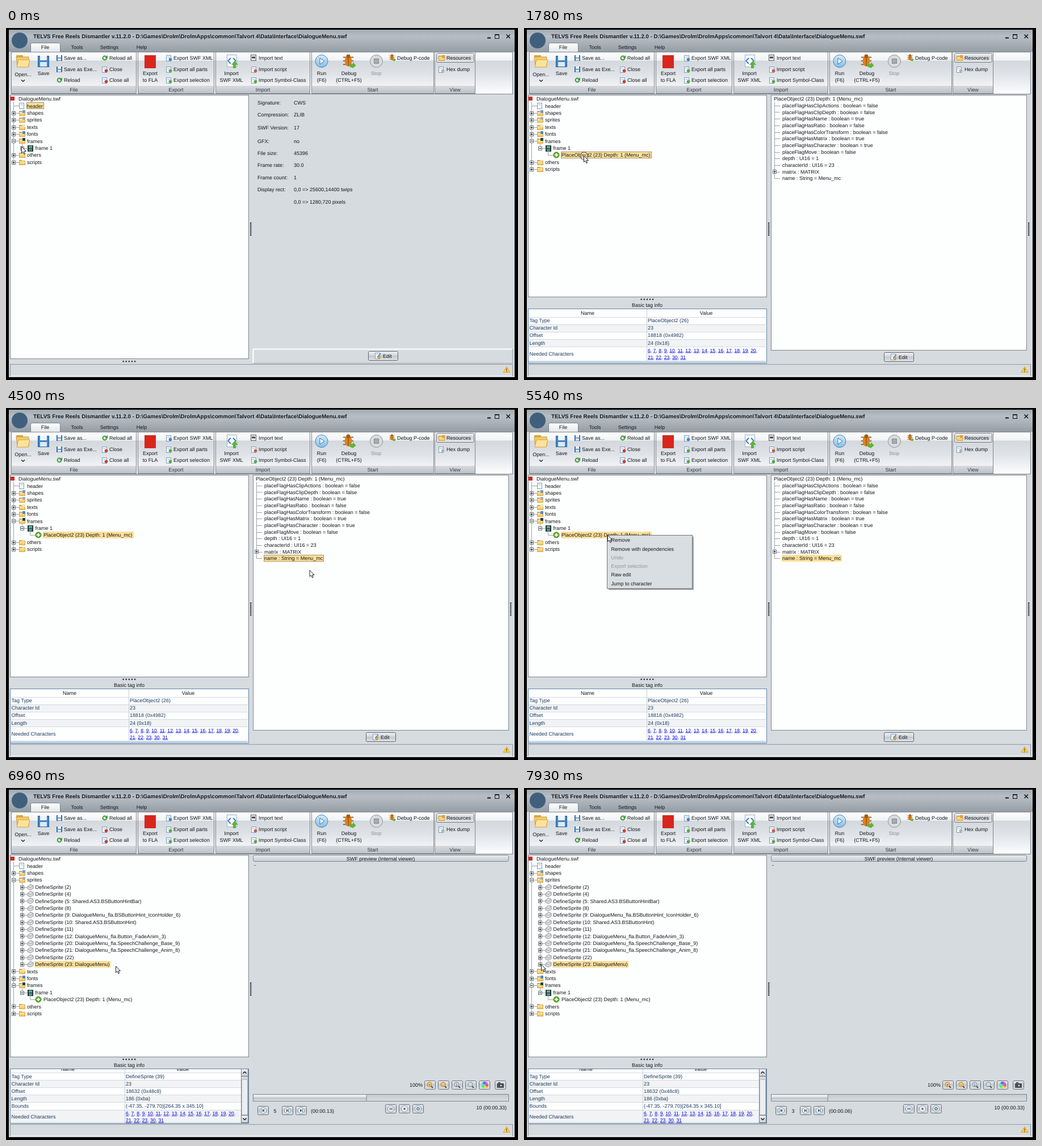
Recreate the animation shown at these times as an HTML page with a canvas. Size 902 by 621 pixels, loop 7990 ms.

```html
<!DOCTYPE html>
<html lang="en">
<head>
<meta charset="utf-8">
<title>Resource browser</title>
<style>
html, body { margin: 0; width: 100%; height: 100%; overflow: hidden; background: #000; }
canvas { display: block; }
</style>
</head>
<body>
<canvas id="stage" width="902" height="621"></canvas>
<script>
const LOOP = 7990;
const EXPAND = 480, SELECT = 1750, PICK_NAME = 3310, MENU_OPEN = 5360, JUMP = 6570;
const BODY = '#d6dbdf', INK = '#15181b', EDGE = '#7d858c', NAVY = '#1d3a60', PICKED = '#fde09c';
const c = document.getElementById('stage').getContext('2d');
c.textRendering = 'geometricPrecision';

function box(x, y, w, h, fill, stroke) {
  if (fill) { c.fillStyle = fill; c.fillRect(x, y, w, h); }
  if (stroke) { c.strokeStyle = stroke; c.lineWidth = 1; c.strokeRect(x + .5, y + .5, w - 1, h - 1); }
}
function rounded(x, y, w, h, r, fill, stroke) {
  c.beginPath(); c.roundRect(x + .5, y + .5, w - 1, h - 1, r);
  c.fillStyle = fill; c.fill();
  c.strokeStyle = stroke; c.lineWidth = 1; c.stroke();
}
function line(x1, y1, x2, y2, color, width = 1) {
  c.beginPath(); c.moveTo(x1, y1); c.lineTo(x2, y2);
  c.strokeStyle = color; c.lineWidth = width; c.stroke();
}
function disc(x, y, r, fill, stroke, width = 1) {
  c.beginPath(); c.arc(x, y, r, 0, 7);
  if (fill) { c.fillStyle = fill; c.fill(); }
  if (stroke) { c.strokeStyle = stroke; c.lineWidth = width; c.stroke(); }
}
function poly(points, fill, stroke) {
  c.beginPath(); points.forEach(p => c.lineTo(...p)); c.closePath();
  if (fill) { c.fillStyle = fill; c.fill(); }
  if (stroke) { c.strokeStyle = stroke; c.lineWidth = 1; c.stroke(); }
}
function shade(y1, y2, ...stops) {
  const g = c.createLinearGradient(0, y1, 0, y2);
  stops.forEach(([at, color]) => g.addColorStop(at, color));
  return g;
}
// y is the vertical middle of the capitals
function text(s, x, y, align = 'left', color = INK, size = 9, weight = '') {
  c.font = `${weight} ${size}px "Liberation Sans", Arial, sans-serif`;
  c.textAlign = align; c.fillStyle = color;
  c.fillText(s, x, y + 3.2);
}
const center = (s, x, y, color) => text(s, x, y, 'center', color);

// Icons, all placed by their middle
const icon = {
  page(x, y, badge) {
    box(x - 5, y - 5, 9, 11, '#f4f8fc', '#7f9dbd');
    line(x - 3, y - 1.5, x + 2, y - 1.5, '#a9bfd6');
    if (badge) disc(x + 2.5, y + 2.5, 2.8, badge);
  },
  folder(x, y, badge) {
    box(x - 5, y - 4, 5, 3, '#d9a63c');
    box(x - 5, y - 3, 11, 8, shade(y - 3, y + 5, [0, '#fdeeb9'], [1, '#efc04f']), '#d3a445');
    if (badge) box(x + 1, y - 5, 5, 5, badge);
  },
  disk(x, y, s = 5) {
    box(x - s, y - s, 2 * s, 2 * s, '#3f86c6', '#255f99');
    box(x - s * .6, y - s, s * 1.2, s * .8, '#eef4fa');
    box(x - s * .6, y + s * .1, s * 1.2, s * .8, '#dce9f5');
  },
  reload(x, y) {
    disc(x, y, 3.4, null, '#3f9a3c', 2);
    poly([[x, y], [x + 5, y], [x + 5, y - 5]], '#3f9a3c');
  },
  film(x, y) {
    box(x - 5, y - 5, 10, 11, '#20343a');
    box(x - 3, y - 4, 6, 4, '#5fb08a'); box(x - 3, y + 1, 6, 4, '#4a9a78');
  },
  sprite(x, y) {
    poly([[x - 5, y - 1], [x, y - 5], [x + 5, y - 3], [x + 5, y + 2], [x, y + 5], [x - 5, y + 3]], '#dcdedf', '#909496');
    line(x - 4, y - 1, x, y + 1, '#a2a6a8'); line(x, y + 1, x + 4, y - 2, '#a2a6a8');
  },
  plus(x, y) {
    disc(x, y, 5, '#62b324', '#3c8512');
    line(x - 3, y, x + 3, y, '#fff', 1.8); line(x, y - 3, x, y + 3, '#fff', 1.8);
  },
  mark(x, y) { box(x - 3, y - 4, 7, 7, '#d9281f'); },
  bug(x, y, s = 1) {
    for (const k of [-4, 0, 4]) line(x - 8 * s, y + k * 1.4 * s, x + 8 * s, y + k * 1.4 * s, '#7a4a14', 1.3 * s);
    c.beginPath(); c.ellipse(x, y, 5.5 * s, 8.5 * s, 0, 0, 7); c.fillStyle = '#d98320'; c.fill();
    line(x, y - 6 * s, x, y + 8 * s, '#8a4c0c', s);
    disc(x, y - 7 * s, 3 * s, '#a75b12');
    poly([[x + 2 * s, y + 5 * s], [x + 7 * s, y + 5 * s], [x + 7 * s, y + 2 * s], [x + 12 * s, y + 7 * s], [x + 7 * s, y + 11 * s], [x + 2 * s, y + 9 * s]], '#5db436');
  },
  warning(x, y) {
    poly([[x, y - 5], [x + 6, y + 5], [x - 6, y + 5]], '#fbd24a', '#dfa22a');
    line(x, y - 2, x, y + 2, '#6b4a0a', 1.3); box(x - .6, y + 3, 1.3, 1.3, '#6b4a0a');
  }
};

function drawWindow() {
  box(0, 0, 902, 621, '#000');
  box(5, 3, 891, 613, BODY);
  box(5, 3, 891, 39, shade(3, 42, [0, '#a3abb2'], [.3, '#b7bec5'], [.62, '#a9b0b7'], [1, '#959da5']));
  text('TELVS Free Reels Dismantler v.11.2.0 - D:\\Games\\Drolm\\DrolmApps\\common\\Talvort 4\\Data\\Interface\\DialogueMenu.swf', 48, 14.5, 'left', INK, 9.72, 'bold');
  line(848, 17.5, 854, 17.5, '#111', 2);
  box(861, 11, 8, 8, null, '#111'); line(861, 12, 869, 12, '#111', 1.5);
  line(881.5, 11.5, 888, 18, '#111', 1.5); line(888, 11.5, 881.5, 18, '#111', 1.5);

  rounded(43, 26, 53, 19, 3, shade(26, 42, [0, '#fff'], [1, '#e3e7ea']), EDGE);
  [['File', 69], ['Tools', 125], ['Settings', 182], ['Help', 239]].forEach(([s, x]) => center(s, x, 34));

  const ribbon = shade(42, 116, [0, '#fff'], [.2, '#f0f2f4'], [.22, '#d3d8dd'], [.55, '#e0e4e8'], [1, '#fdfdfe']);
  box(9, 42, 884, 75, ribbon, EDGE);
  [['File', 9, 230], ['Export', 232, 367], ['Import', 369, 536], ['Start', 538, 754], ['View', 755, 827]].forEach(([s, l, r]) => {
    box(l, 42, r - l, 74, ribbon, '#80878e');
    box(l + 1, 102, r - l - 2, 13, shade(102, 115, [0, '#d6dade'], [1, '#bcc3c9']));
    center(s, (l + r) / 2, 109, '#33393f');
  });
  disc(24, 22, 14, '#3f5f7d');
}

function drawRibbon() {
  box(18, 48, 12, 6, '#d9a63c');
  poly([[18, 51], [40, 51], [40, 68], [20, 68]], '#f3cc6b', '#c99a3c');
  poly([[22, 56], [42, 56], [39, 69], [19, 69]], '#fbe29a', '#d3a445');
  center('Open...', 30, 82);
  line(27, 91.5, 30, 94.5, INK, 1.3); line(30, 94.5, 33, 91.5, INK, 1.3);
  icon.disk(66, 59, 10); center('Save', 66, 80);

  const rows = [53, 72.5, 92];
  const column = (x, ...names) => names.forEach((s, i) => text(s, x, rows[i]));
  column(102, 'Save as...', 'Save as Exe...', 'Reload');
  column(182, 'Reload all', 'Close', 'Close all');
  column(295, 'Export SWF XML', 'Export all parts', 'Export selection');
  column(445, 'Import text', 'Import script', 'Import Symbol-Class');
  icon.disk(94, 53); icon.disk(94, 73); icon.reload(94, 92); icon.reload(174, 53);
  icon.page(174, 73, '#cf3a2b'); icon.page(174, 92, '#cf3a2b');
  icon.page(287, 53, '#4a82c4'); icon.page(287, 73, '#58a83e'); icon.page(287, 92, '#58a83e');
  box(431, 47, 10, 11, '#e5e8ea', '#5b6268'); line(433, 52, 439, 52, '#444', 3);
  icon.page(437, 73, '#cc5b4b'); icon.page(437, 92, '#58a83e');

  box(244, 48, 20, 23, '#d8261c');
  center('Export', 254, 80); center('to FLA', 254, 91.5);
  box(389, 47, 18, 22, '#f8fafc', '#9fb2c6');
  line(396, 53, 391, 58, '#3d7fc0', 2); line(391, 58, 396, 63, '#3d7fc0', 2);
  line(400, 53, 405, 58, '#3d7fc0', 2); line(405, 58, 400, 63, '#3d7fc0', 2);
  poly([[397, 65], [403, 58], [409, 65], [405, 65], [405, 71], [400, 71], [400, 65]], '#5db436');
  center('Import', 397, 80); center('SWF XML', 397, 91.5);

  disc(556, 58.5, 11, shade(47, 70, [0, '#d8edfb'], [1, '#83bde6']), '#4584b5');
  poly([[553, 53], [561, 58.5], [553, 64]], '#fff', '#2f6fa6');
  center('Run', 556, 80); center('(F6)', 556, 91.5);
  icon.bug(603, 58, 1.15); center('Debug', 604, 80); center('(CTRL+F5)', 604, 91.5);
  disc(652.5, 58.5, 11, '#d9dcde', '#8d9296'); box(648, 54, 9, 9, '#a6abaf', '#868b90');
  center('Stop', 652, 80, '#8c9196');
  icon.bug(680, 52, .58); text('Debug P-code', 689, 53);

  rounded(758, 44, 67, 17, 2, shade(44, 61, [0, '#f2f3f4'], [.5, '#d0d5d9'], [1, '#e9ecee']), '#70777d');
  icon.folder(767, 53, '#eb9a3b'); text('Resources', 776, 53);
  icon.page(767, 73, '#a9b4be'); text('Hex dump', 776, 72.5);
}

function handle(x, y, open) {
  x = Math.round(x); y = Math.round(y);
  box(x - 3, y - 3, 7, 7, '#fff', '#6d747a');
  line(x - 1.5, y + .5, x + 2.5, y + .5, '#111');
  if (!open) line(x + .5, y - 1.5, x + .5, y + 2.5, '#111');
}
function highlight(s, x, y, bordered) {
  c.font = '9px "Liberation Sans", Arial, sans-serif';
  box(x - 1, Math.round(y - 6), Math.round(c.measureText(s).width + 3), 12, PICKED, bordered && '#a8925c');
}

const SPRITES = ['2', '4', '5: Shared.AS3.BSButtonHintBar', '8', '9: DialogueMenu_fla.BSButtonHint_IconHolder_6',
  '10: Shared.AS3.BSButtonHint', '11', '12: DialogueMenu_fla.Button_FadeAnim_3', '20: DialogueMenu_fla.SpeechChallenge_Base_9',
  '21: DialogueMenu_fla.SpeechChallenge_Anim_8', '22', '23: DialogueMenu'].map(s => `DefineSprite (${s})`);
const PLACE = 'PlaceObject2 (23) Depth: 1 (Menu_mc)';

// Each row: level, label, icon, badge, handle
function treeRows(t) {
  return [
    [0, 'DialogueMenu.swf', 'mark'],
    [1, 'header', 'page'],
    [1, 'shapes', 'folder', '#6b9bd0', '+'],
    [1, 'sprites', 'folder', '#a9adb0', t >= JUMP ? '-' : '+'],
    ...(t >= JUMP ? SPRITES.map(s => [2, s, 'sprite', '', '+']) : []),
    [1, 'texts', 'folder', '#f3e3b0', '+'],
    [1, 'fonts', 'folder', '#4b86d0', '+'],
    [1, 'frames', 'folder', '#23423f', '-'],
    [2, 'frame 1', 'film', '', t >= EXPAND ? '-' : '+'],
    ...(t >= EXPAND ? [[3, PLACE, 'plus']] : []),
    [1, 'others', 'folder', '', '+'],
    [1, 'scripts', 'folder', '', '+']
  ];
}
function drawTree(t) {
  box(7, 118, 421, t < SELECT ? 466 : 357, '#fdfefe', EDGE);
  const picked = t < SELECT ? 'header' : t < JUMP ? PLACE : SPRITES[11];
  const lastY = [], handles = [];
  treeRows(t).forEach(([level, label, kind, badge, mark], i) => {
    const y = 125 + 12.4 * i, x = level ? 22.5 + 14.5 * level : 22, stemX = Math.round(x - 24) + .5;
    if (level) {
      const top = Math.max(lastY[level] || 0, lastY[level - 1] + 5);
      line(stemX, top, stemX, y, '#9aa1a7');
      line(stemX, Math.round(y) + .5, x - 14, Math.round(y) + .5, '#9aa1a7');
    }
    lastY[level] = y;
    if (mark) handles.push([stemX - .5, y, mark === '-']);
    icon[kind](level ? Math.round(x - 9) : 11, Math.round(y), badge);
    if (label === picked) highlight(label, x, y, t < PICK_NAME);
    text(label, x, y);
  });
  handles.forEach(h => handle(...h));
}

const FLAGS = [['ClipActions', 0], ['ClipDepth', 0], ['Name', 1], ['Ratio', 0], ['ColorTransform', 0], ['Matrix', 1], ['Character', 1]];
const FIELDS = [...FLAGS.map(([s, on]) => `placeFlagHas${s} : boolean = ${!!on}`),
  'placeFlagMove : boolean = false', 'depth : UI16 = 1', 'characterId : UI16 = 23', 'matrix : MATRIX', 'name : String = Menu_mc'];

function editButton(x, y) {
  rounded(x, y, 53, 17, 2, shade(y, y + 17, [0, '#f4f5f6'], [.45, '#d3d7db'], [.5, '#c2c8cd'], [1, '#e4e7ea']), '#60676d');
  icon.page(x + 17, y + 8, '#e0a136');
  line(x + 16, y + 11, x + 22, y + 4, '#4e87c6', 1.5);
  text('Edit', x + 26, y + 8.5);
}
function drawHeaderInfo() {
  [['Signature:', 'CWS', 132], ['Compression:', 'ZLIB', 152.5], ['SWF Version:', '17', 175.5], ['GFX:', 'no', 199.5],
   ['File size:', '45396', 220.5], ['Frame rate:', '30.0', 242], ['Frame count:', '1', 264],
   ['Display rect:', '0,0 => 25600,14400 twips', 285], ['', '0,0 => 1280,720 pixels', 307]].forEach(([name, value, y]) => {
    text(name, 443, y); text(value, 507, y);
  });
  box(435, 566, 458, 26, BODY, '#9aa2a9');
  line(435, 566.5, 892, 566.5, '#fff', 2); line(435.5, 566, 435.5, 591, '#fff', 2);
  editButton(638, 570);
}
function drawFields(t) {
  box(435, 118, 451, 451, '#fdfefe', EDGE);
  text(PLACE, 440, 125);
  line(441.5, 131, 441.5, 265, '#9aa1a7');
  FIELDS.forEach((s, i) => {
    const y = 136.8 + 11.68 * i;
    line(441, Math.round(y) + .5, 451, Math.round(y) + .5, '#9aa1a7');
    if (i === 11 && t >= PICK_NAME) highlight(s, 455, y, t < MENU_OPEN);
    text(s, 455, y);
  });
  handle(441, 253, false);
  editButton(634, 572);
}

function smallButton(x, y) {
  rounded(x, y, 20, 16, 2, shade(y, y + 16, [0, '#eceef0'], [.5, '#c5cbd0'], [1, '#dfe3e6']), '#6b7278');
}
function drawPreview(t) {
  rounded(435, 118, 451, 12, 3, shade(118, 130, [0, '#eceff1'], [1, '#c3c9ce']), EDGE);
  center('SWF preview (Internal viewer)', 660, 125);
  text('-', 437, 136);

  text('100%', 711, 524);
  ['+', '-', '1', '::'].forEach((s, i) => {
    const x = 737 + 24 * i;
    smallButton(x, 516);
    line(x + 11, 525, x + 15, 529, '#4f4a42', 2);
    disc(x + 9, 523, 4, i < 2 ? '#f8c878' : '#d7eaf6', i < 2 ? '#b97f28' : '#6f8798');
    text(s, x + 9, 523, 'center', '#333', 7);
  });
  smallButton(833, 516);
  for (let i = 0; i < 12; i++) {
    c.beginPath(); c.moveTo(843.5, 524); c.arc(843.5, 524, 6, i * .5236, (i + 1.1) * .5236);
    c.fillStyle = `hsl(${i * 30} 80% 62%)`; c.fill();
  }
  smallButton(861, 516);
  box(865, 521, 12, 8, '#4c5359'); box(867, 519, 4, 2, '#4c5359'); disc(872, 525, 2.5, '#a9c0d2', '#222');

  // Playback: ten frames, wrapping
  const step = Math.floor((Math.min(t, 7940) - 6950) / 34.9) + 4;
  const frame = (step % 10 + 10) % 10;
  box(435, 540, 451, 13, shade(540, 553, [0, '#c3c9ce'], [1, '#d9dde1']), EDGE);
  box(436, 541, Math.round(449 * frame / 9), 11, shade(541, 552, [0, '#eff1f3'], [.45, '#dfe3e6'], [.5, '#bac1c7'], [1, '#dce0e4']));
  if (frame) line(435.5 + 449 * frame / 9, 541, 435.5 + 449 * frame / 9, 552, EDGE);

  [[443, 561, '«'], [486, 561, '»'], [510, 561, '›'], [668, 558, 'Ⅱ'], [692, 558, '■'], [716, 558, '↻']].forEach(([x, y, s]) => {
    smallButton(x, y);
    disc(x + 10, y + 8, 5.5, '#eaf3f9', '#8098a9');
    if (s === 'Ⅱ') { box(x + 8, y + 6, 1.4, 4, '#33546d'); box(x + 11, y + 6, 1.4, 4, '#33546d'); }
    else if (s === '■') box(x + 8.5, y + 6.5, 3, 3, '#33546d');
    else if (s === '↻') disc(x + 10, y + 8, 2.2, null, '#33546d', 1.2);
    else {
      const d = s === '«' ? -1 : 1;
      poly([[x + 10 - 2 * d, y + 5], [x + 10 + d, y + 8], [x + 10 - 2 * d, y + 11]], '#33546d');
      line(x + 10 + 2 * d, y + 5, x + 10 + 2 * d, y + 11, '#33546d');
    }
  });
  text(frame + 1, 474, 569.5, 'center');
  text(`(00:00.${String(Math.floor(frame * 100 / 30)).padStart(2, '0')})`, 537, 569.5);
  text('10 (00:00.33)', 882, 564, 'right');
}

function links(numbers, x, y) {
  numbers.forEach((n, i) => {
    text(n, x, y, 'left', '#0000e0', 8.62);
    const w = c.measureText(n).width;
    line(x, y + 4.5, x + w, y + 4.5, '#0000e0', .8);
    x += w;
    const comma = i < numbers.length - 1 || n === 20 ? ', ' : '';
    text(comma, x, y, 'left', NAVY, 8.62);
    x += c.measureText(', ').width;
  });
}
function drawTagInfo(t) {
  const jumped = t >= JUMP, right = jumped ? 414 : 426, valueX = jumped ? 211 : 218;
  const rows = jumped
    ? [['Tag Type', 'DefineSprite (39)'], ['Character Id', '23'], ['Offset', '18632 (0x48c8)'], ['Length', '186 (0xba)'], ['Bounds', '(-47.35, -279.70)[264.35 x 345.10]']]
    : [['Tag Type', 'PlaceObject2 (26)'], ['Character Id', '23'], ['Offset', '18818 (0x4982)'], ['Length', '24 (0x18)']];
  center('Basic tag info', 217, 489);
  c.save();
  c.beginPath(); c.rect(7, 495, 421, 97); c.clip();
  box(7, 495, 421, 97, '#fdfefe');
  const first = jumped ? 508.5 : 516;
  center('Name', jumped ? 109 : 112, first - 13); center('Value', jumped ? 311 : 321, first - 13);
  [...rows, ['Needed Characters', '']].forEach(([name, value], i) => {
    const y = first + 13.1 * i, last = i === rows.length;
    if (i % 2) box(8, y - 6.5, right - 8, last ? 26 : 13, '#f1f3f4');
    line(8, Math.round(y - 6.5) + .5, right, Math.round(y - 6.5) + .5, '#d5dade');
    text(name, 9.5, y + (last ? 6 : 0), 'left', NAVY);
    text(value, valueX, y, 'left', NAVY);
  });
  const y = first + 13.1 * rows.length;
  links([6, 7, 8, 9, 10, 11, 12, 13, 14, 15, 16, 17, 18, 19, 20], valueX, y);
  links([21, 22, 23, 30, 31], valueX, y + 12);
  line(valueX - 1.5, 495, valueX - 1.5, 591, '#c9d0d6');
  if (jumped) {
    box(414, 495, 13, 96, '#d3d8dc', EDGE);
    box(415, 514, 11, 63, '#eceff1', '#b3bac0');
    for (const [top, d] of [[495, -1], [577, 1]]) {
      box(414, top, 13, 14, shade(top, top + 14, [0, '#f2f3f5'], [1, '#c5cbd0']), '#70777d');
      line(417.5, top + 7 - 1.5 * d, 420.5, top + 7 + 1.5 * d, '#111', 1.4);
      line(420.5, top + 7 + 1.5 * d, 423.5, top + 7 - 1.5 * d, '#111', 1.4);
    }
  } else box(8, 587, 418, 4, '#c9d8e6');
  box(7, 495, 421, 97, null, '#6585a8');
  c.restore();
}

function drawSplitters(t) {
  const dot = (x, y) => box(x, y, 2.4, 2.4, '#30363b');
  for (let i = 0; i < 7; i++) {
    dot(430, 343 + 3.5 * i);
    if (t >= SELECT && t < JUMP) dot(888, 343 + 3.5 * i);
  }
  for (let i = 0; i < 5; i++) dot(205.5 + 5.1 * i, t < SELECT ? 587 : 477.5);
  box(7, 593, 886, 21, BODY, '#8f979e');
  line(8, 613.5, 892, 613.5, '#f4f6f7');
  icon.warning(882, 602.5);
}

function drawMenu(tip) {
  box(149, 227, 150, 94, 'rgba(0,0,0,.35)');
  box(146, 224, 151, 95, '#d9dee2', '#6d747a');
  const items = ['Remove', 'Remove with dependencies', 'Undo', 'Export selection', 'Raw edit', 'Jump to character'];
  const hover = Math.floor((tip[1] - 225.5) / 15.3);
  items.forEach((s, i) => {
    const y = 233 + 15.3 * i, off = i === 2 || i === 3;
    if (i === hover && !off) box(147, Math.round(y - 7.5), 149, 15, shade(y - 8, y + 8, [0, '#f9e6c0'], [.5, '#eccf98'], [1, '#f3dcae']), '#cdaa6c');
    text(s, 153.5, y, 'left', off ? '#8f969c' : INK);
  });
}

// Pointer tip: time, x, y
const PATH = [[0, 27, 209], [60, 27, 209], [270, 28, 213], [970, 28, 213], [1360, 105, 225], [2580, 105, 225],
  [3030, 517, 273], [3150, 538, 284], [3340, 542, 263], [3810, 542, 263], [4050, 548, 280], [4250, 546, 294],
  [4500, 535, 286], [4590, 402, 251], [4800, 205, 221], [5040, 147, 224], [5540, 147, 224], [6240, 193, 314],
  [7230, 193, 314], [7910, 30, 311], [LOOP, 30, 311]];
const CLICKS = [[450, 690], [1750, 1870], [3340, 3640], [5210, 5360], [6420, 6500]];

function slope(i, k) {
  const a = PATH[i - 1], b = PATH[i], d = PATH[i + 1];
  const resting = p => !p || (p[1] === b[1] && p[2] === b[2]);
  return resting(a) || resting(d) ? 0 : (d[k] - a[k]) / (d[0] - a[0]);
}
function pointer(t) {
  let i = 0;
  while (i < PATH.length - 2 && t >= PATH[i + 1][0]) i++;
  const a = PATH[i], b = PATH[i + 1], span = b[0] - a[0], u = (t - a[0]) / span, v = 1 - u;
  return [1, 2].map(k => v * v * (1 + 2 * u) * a[k] + u * u * (3 - 2 * u) * b[k]
    + span * u * v * (v * slope(i, k) - u * slope(i + 1, k)));
}
function drawPointer(t, [x, y]) {
  if (CLICKS.some(([from, to]) => t >= from && t < to)) disc(x + .8, y + .8, 6.8, 'rgba(255,245,200,.25)', '#4a463c');
  poly([[0, 0], [0, 11], [2.6, 8.8], [4.4, 13], [6.2, 12.2], [4.5, 8.2], [8, 8]].map(p => [x + p[0] + .5, y + p[1] + .5]), '#fff', '#1c2030');
}

function draw(t) {
  const tip = pointer(t);
  drawWindow();
  drawRibbon();
  drawTree(t);
  if (t < SELECT) drawHeaderInfo();
  else {
    if (t < JUMP) drawFields(t); else drawPreview(t);
    drawTagInfo(t);
  }
  drawSplitters(t);
  if (t >= MENU_OPEN && t < JUMP) drawMenu(tip);
  drawPointer(t, tip);
}

const start = performance.now();
function tick() {
  draw((performance.now() - start) % LOOP);
  requestAnimationFrame(tick);
}
tick();
</script>
</body>
</html>
```
